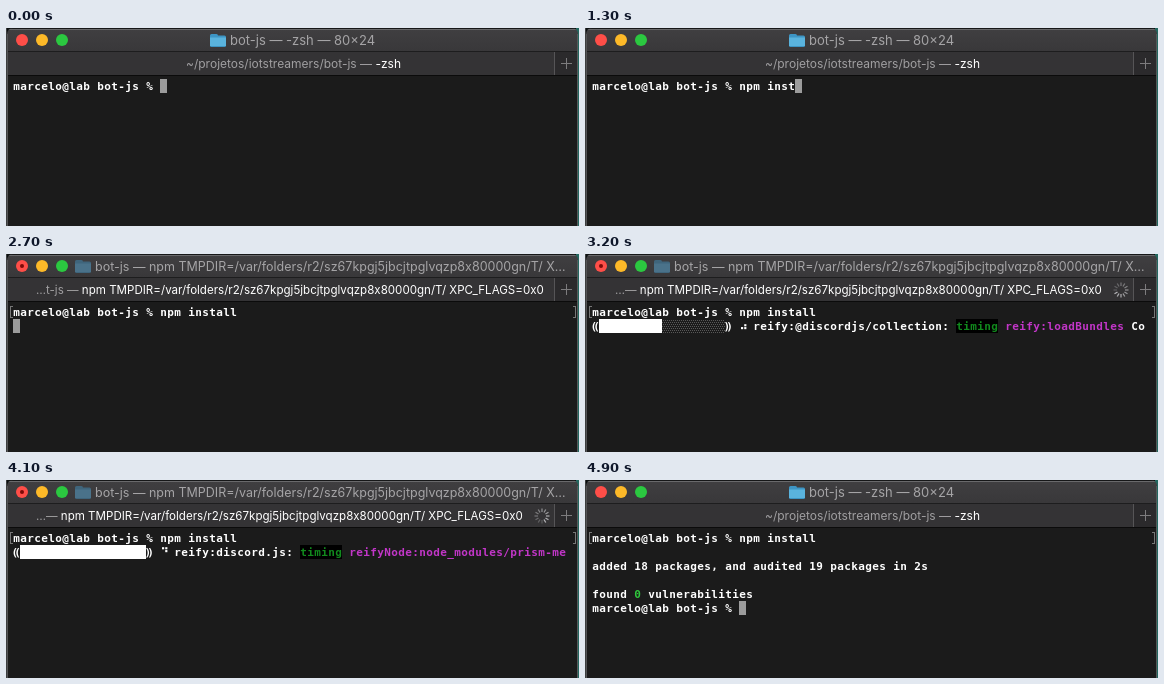
Animation of 573 by 198 pixels, one loop 6000 ms. Source, as an HTML page with a canvas:

```html
<!DOCTYPE html>
<html lang="en">
<head>
<meta charset="utf-8">
<title>npm install</title>
<style>
  html, body { margin: 0; width: 100%; height: 100%; overflow: hidden; background: #0c1011; }
  canvas { display: block; }
</style>
</head>
<body>
<canvas id="stage" width="573" height="198"></canvas>
<script>
const ctx = document.getElementById('stage').getContext('2d');
const LOOP = 6000, CELL = 7, ROW = 14, TOP = 51;
const UI = 'Inter, sans-serif';
const MONO = 'bold 11px "DejaVu Sans Mono", "DejaVu Sans", monospace';
const PROMPT = 'marcelo@lab bot-js % ';
const COMMAND = 'npm install';
const JOB = 'npm TMPDIR=/var/folders/r2/sz67kpgj5jbcjtpglvqzp8x80000gn/T/ X';
const KEY_TIMES = [300, 600, 800, 1000, 1100, 1200, 1300, 1300, 1400, 1600, 1800];
const ENTER = 2500, RUN = 2700, BAR = 3000, DONE = 4500, IDLE = 4600, CLEAN = 4900;
const BAR_CELLS = 18, SPINNER = '⠋⠙⠹⠸⠼⠴⠦⠧⠇⠏';

const MESSAGES = [
  [3000, 'idealTree:bot-js:', 'idealTree:init', 'Completed in 9ms'],
  [3200, 'reify:@discordjs/collection:', 'reify:loadBundles', 'Completed in 0ms'],
  [3700, 'reify:discord.js:', 'reifyNode:node_modules/prism-media', 'Completed in 700ms'],
];

function rect(x, y, w, h, color) {
  ctx.fillStyle = color;
  ctx.fillRect(x, y, w, h);
}

function disc(x, y, r, color) {
  ctx.fillStyle = color;
  ctx.beginPath();
  ctx.arc(x, y, r, 0, Math.PI * 2);
  ctx.fill();
}

// Draws text and returns its right edge.
function label(text, x, y, size, color) {
  ctx.font = `${size}px ${UI}`;
  ctx.fillStyle = color;
  ctx.fillText(text, x, y);
  return x + ctx.measureText(text).width;
}

// Writes on the terminal grid and returns the next column.
function put(text, col, row, color = '#fff') {
  ctx.font = MONO;
  ctx.fillStyle = color;
  for (const ch of text) ctx.fillText(ch, CELL * (1 + col++) + 0.2, TOP + ROW * row + 11);
  return col;
}

function cursor(col, row) {
  rect(CELL * (1 + col), TOP + ROW * row, CELL, ROW, '#9c9c9c');
}

function bracket(spine, tick) {
  rect(spine, 52, 1, 12, '#777');
  for (const y of [52, 63]) rect(tick, y, 3, 1, '#777');
}

function folder(x, dim) {
  ctx.fillStyle = dim ? '#3f657c' : '#3d95c4';
  ctx.beginPath();
  ctx.roundRect(x, 6, 8, 5, 1.5);
  ctx.roundRect(x, 7.5, 16, 11.5, 1.5);
  ctx.fill();
  rect(x, 9.5, 16, 8.5, dim ? '#4a728a' : '#5ab3dd');
}

function tabSpinner(t) {
  const head = Math.floor(t / 100);
  ctx.lineWidth = 1.3;
  for (let i = 0; i < 12; i++) {
    const a = i * Math.PI / 6, age = (head - i + 1200) % 12;
    ctx.strokeStyle = `rgba(205,205,208,${0.85 - age * 0.055})`;
    ctx.beginPath();
    ctx.moveTo(536 + 4 * Math.sin(a), 36 - 4 * Math.cos(a));
    ctx.lineTo(536 + 7.5 * Math.sin(a), 36 - 7.5 * Math.cos(a));
    ctx.stroke();
  }
}

function drawWindow(t) {
  const running = t >= RUN && t < IDLE;
  const busy = t >= RUN && t < CLEAN;

  rect(0, 0, 573, 198, '#0c1011');
  rect(0, 0, 1, 198, '#3c3e3f');
  rect(570, 0, 3, 198, '#23675f');
  ctx.save();
  ctx.beginPath();
  ctx.roundRect(1, 0, 571, 210, 6);
  ctx.clip();
  const bar = ctx.createLinearGradient(0, 0, 0, 23);
  bar.addColorStop(0, '#403f41');
  bar.addColorStop(1, '#39383a');
  rect(0, 0, 573, 24, bar);
  rect(0, 0, 573, 1, '#161718');
  rect(0, 1, 573, 1, '#69696b');
  rect(0, 23, 573, 1, '#1d1d1e');
  rect(0, 24, 549, 23, '#343335');
  rect(549, 24, 24, 23, '#2b2a2c');
  rect(548, 24, 1, 23, '#565557');
  rect(0, 47, 573, 1, '#0b0b0b');
  rect(0, 48, 573, 150, '#1b1b1b');
  rect(1, 6, 1, 192, '#545456');
  rect(571, 6, 1, 192, '#545a59');
  ctx.restore();

  rect(555, 35, 11, 1, '#7d7c7e');
  rect(560, 30, 1, 11, '#7d7c7e');
  ['#fe4e48', '#fdb928', '#2bc840'].forEach((c, i) => disc(16 + 20 * i, 12, 6, c));
  if (busy) disc(16, 12, 2, '#7c0a08');

  // The long job name is set a little smaller so that it fits the bars.
  const titleSize = running ? 12.5 : 13, tabSize = running ? 11.57 : 12;
  const x = running ? 69 : 204;
  folder(x, busy);
  label(running ? `bot-js — ${JOB}…` : 'bot-js — -zsh — 80×24', x + 20, 17, titleSize, '#a5a4a6');

  const spinning = running && t >= BAR;
  const path = !running ? '~/projetos/iotstreamers/bot-js — ' : spinning ? '…— ' : '…t-js — ';
  const end = label(path, running ? 30 : 180, 40, tabSize, '#a09fa1');
  label(running ? JOB + 'PC_FLAGS=0x0' : '-zsh', end, 40, tabSize, '#fff');
  if (spinning) tabSpinner(t);
}

function drawProgress(t) {
  const [, task, name, detail] = MESSAGES.findLast(m => t >= m[0]);
  const filled = t < 3100 ? 2 : t < 3700 ? 9 : Math.min(BAR_CELLS, 11 + Math.floor((t - 3700) / 57));
  const y = TOP + ROW, split = 14 + filled * CELL, end = 14 + BAR_CELLS * CELL;

  for (const shift of [-0.25, 0.15]) {
    put('(', shift, 1);
    put(')', BAR_CELLS + 1 + shift, 1);
  }
  rect(14, y, end - 14, ROW, '#1b1b1b');
  for (let py = y + 1; py < y + ROW; py += 2)
    for (let px = split + (py % 4 > 1 ? 1 : 0); px < end; px += 2) rect(px, py, 1, 1, '#585858');
  rect(14, y, split - 14, ROW, '#fff');

  const turn = Math.floor(5 + (t - 3200) / 56 + 10) % 10;
  put(SPINNER[turn], 21, 1);
  let col = put(task, 23, 1) + 1;
  rect(CELL * (1 + col), y, 6 * CELL, ROW, '#000');
  col = put('timing', col, 1, '#118a1d') + 1;
  const room = 79 - col;
  col = put(name.slice(0, room), col, 1, '#c236c8') + 1;
  put(detail.slice(0, Math.max(0, 79 - col)), col, 1);
}

function drawTerminal(t) {
  const typed = KEY_TIMES.filter(k => t >= k).length;
  const col = put(PROMPT + COMMAND.slice(0, typed), 0, 0);
  if (t < ENTER) return cursor(col, 0);

  bracket(4, 4);
  bracket(569, 567);
  if (t < BAR) return cursor(0, 1);
  if (t < DONE) return drawProgress(t);

  put('added 18 packages, and audited 19 packages in 2s', 0, 2);
  put('found ', 0, 4);
  put('0', 6, 4, '#2fc83c');
  put('vulnerabilities', 8, 4);
  cursor(put(PROMPT, 0, 5), 5);
}

function frame(now) {
  const t = Math.floor(now % LOOP / 100) * 100;
  drawWindow(t);
  drawTerminal(t);
  requestAnimationFrame(frame);
}
frame(performance.now());
</script>
</body>
</html>
```
